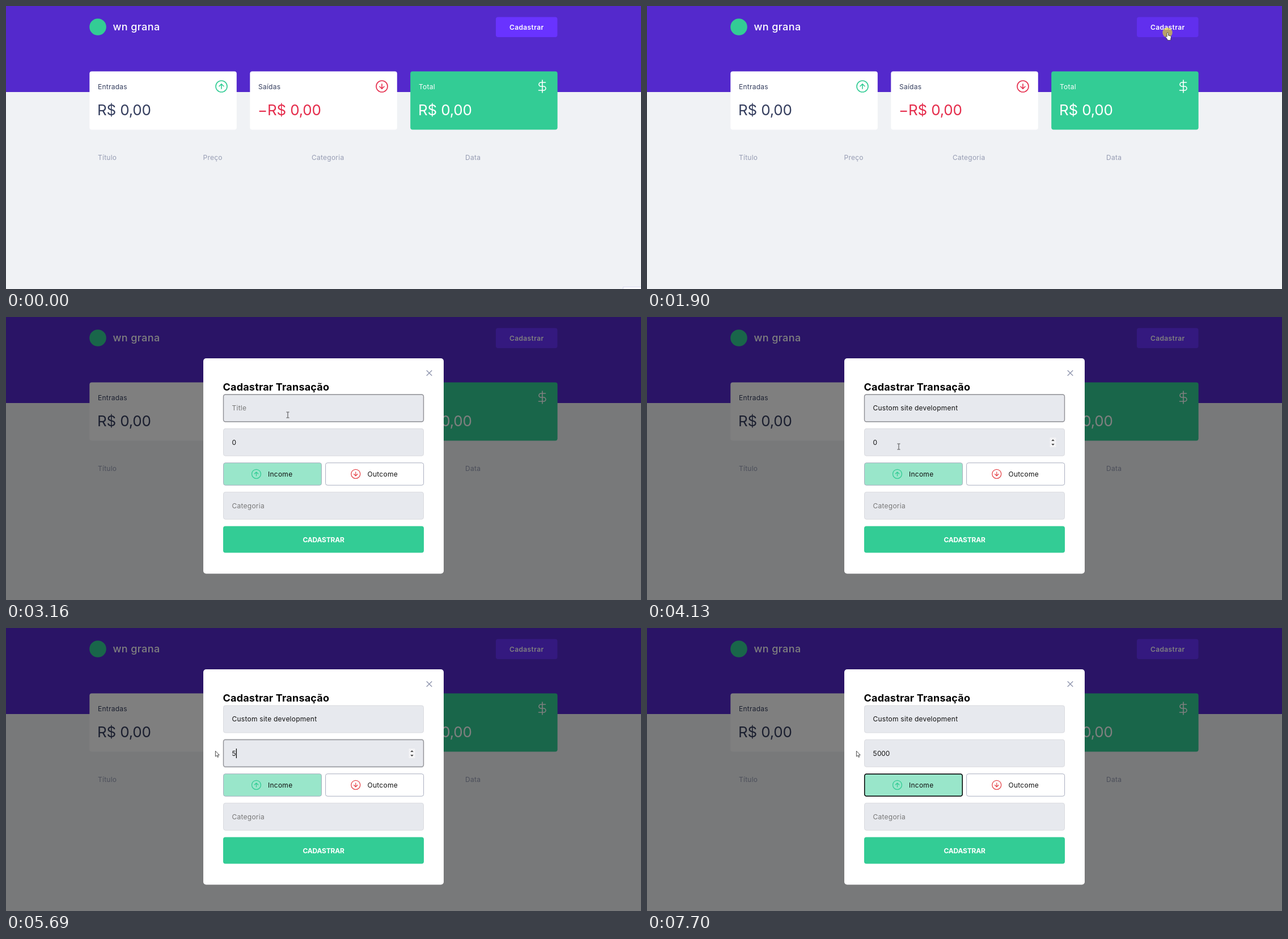
An HTML page that plays this animation: 1120 by 500 pixels, repeating every 8 s.

```html
<!DOCTYPE html>
<html lang="pt-BR">
<head>
<meta charset="utf-8">
<title>Finance dashboard</title>
<style>
html, body { margin: 0; width: 100%; height: 100%; overflow: hidden; background: #f0f2f5; }
svg { display: block; width: 100%; height: 100%; }
text { font: 12px Inter, "Open Sans", sans-serif; letter-spacing: .25px; fill: #363f5f; white-space: pre; }
.brand { font-size: 18px; font-weight: 500; letter-spacing: .4px; fill: #fff; }
.money { font-size: 26px; letter-spacing: -.2px; }
.button { font-weight: 600; letter-spacing: .35px; fill: #fff; text-anchor: middle; }
.submit { font-weight: 700; letter-spacing: -.2px; }
.heading { font-size: 18px; font-weight: 700; letter-spacing: .2px; fill: #000; }
.head text { fill: #969cb3; }
.white { fill: #fff; }
.red { fill: #e52e4d; }
.dark { fill: #111; }
.hint { fill: #777; }
.num { letter-spacing: -.05px; }
.icon { fill: none; stroke: currentColor; stroke-width: 1.6; stroke-linecap: round; stroke-linejoin: round; }
.field { fill: #e7e9ee; stroke: #d9dadf; }
.option { stroke: #a9aebf; }
.ring { fill: none; stroke: #8f9095; stroke-width: 1.4; }

/* Timed parts: hidden unless their keyframes show them. One percent is 80 ms. */
.t { opacity: 0; animation: 8s step-end infinite; }
.corner { animation-name: corner; }
.modal { animation-name: modal; }
.close { animation-name: close; }
.title-hint { animation-name: title-hint; }
.title-text { animation-name: title-text; }
.title-ring { animation-name: title-ring; }
.caret-start { animation-name: caret-start; }
.caret-end { animation-name: caret-end; }
.num-ring { animation-name: num-ring; }
.spinner { animation-name: spinner; }
.zero { animation-name: zero; }
.select { animation-name: select; }
.d1 { animation-name: d1; }
.d2 { animation-name: d2; }
.d3 { animation-name: d3; }
.d4 { animation-name: d4; }
.num-caret { animation-name: num-caret; }
.income-ring { animation-name: income-ring; }
.halo { animation-name: halo; }
.arrow { animation-name: arrow; }
.hand { animation-name: hand; }
.beam { animation-name: beam; }
.cta { fill: #6933ff; animation: hover 8s linear infinite; }
.pointer { animation: path 8s linear infinite; }

@keyframes corner { 0% { opacity: 1 } .375% { opacity: 0 } }
@keyframes modal { 24.625% { opacity: 1 } }
@keyframes close { 25.25% { opacity: 1 } }
@keyframes title-hint { 0% { opacity: 1 } 45.125% { opacity: 0 } }
@keyframes title-text { 45.125% { opacity: 1 } }
@keyframes title-ring { 32.875% { opacity: 1 } 60.125% { opacity: 0 } }
@keyframes caret-start { 32.875% { opacity: 1 } 39.5% { opacity: 0 } }
@keyframes caret-end {
  45.125%, 57.875% { opacity: 1 }
  51.625%, 60.125% { opacity: 0 }
}
@keyframes num-ring { 60.125% { opacity: 1 } 96.25% { opacity: 0 } }
@keyframes spinner { 50.5% { opacity: 1 } 96.25% { opacity: 0 } }
@keyframes zero { 0% { opacity: 1 } 71.125% { opacity: 0 } }
@keyframes select { 61.25% { opacity: 1 } 71.125% { opacity: 0 } }
@keyframes d1 { 71.125% { opacity: 1 } }
@keyframes d2 { 75% { opacity: 1 } }
@keyframes d3 { 77.75% { opacity: 1 } }
@keyframes d4 { 89.5% { opacity: 1 } }
@keyframes num-caret {
  0%, 61.25%, 84.125%, 96.25% { opacity: 0; transform: none }
  60.125%, 71.125% { opacity: 1; transform: none }
  75% { opacity: 1; transform: translateX(7.4px) }
  77.75% { opacity: 1; transform: translateX(14.8px) }
  89.5% { opacity: 1; transform: translateX(22.2px) }
}
@keyframes income-ring { 96.25% { opacity: 1 } }
@keyframes halo {
  23.75%, 32.875%, 60.125% { opacity: .55 }
  24.625%, 34.125%, 64.75% { opacity: 0 }
}
@keyframes arrow {
  3%, 24.625%, 64.75% { opacity: 1 }
  14.125%, 29.125% { opacity: 0 }
}
@keyframes hand { 14.125% { opacity: 1 } 24.625% { opacity: 0 } }
@keyframes beam { 29.125% { opacity: 1 } 64.75% { opacity: 0 } }
@keyframes hover {
  0%, 14.125%, 27.5%, 100% { fill: #6933ff }
  16.6%, 25% { fill: #612fee }
}
@keyframes path {
  0%, 3% { transform: translate(1044px, 458px) }
  4% { transform: translate(1018px, 431px) }
  7.25% { transform: translate(1018px, 431px); animation-timing-function: ease-in-out }
  14.75%, 25.25% { transform: translate(918px, 47px); animation-timing-function: ease-in-out }
  30.875%, 47.125% { transform: translate(497px, 173px); animation-timing-function: ease-in-out }
  51.625%, 56.75% { transform: translate(444px, 229px) }
  57.875%, 60.125% { transform: translate(426px, 229px) }
  61.75% { transform: translate(385px, 219px) }
  63.2% { transform: translate(362px, 219px) }
  64.75%, 100% { transform: translate(369px, 217px) }
}
</style>
</head>
<body>
<svg viewBox="0 0 1120 500">
  <defs>
    <g id="up" class="icon">
      <circle r="10"/>
      <path d="M0 4.3V-4.3M-4-.3L0-4.3L4-.3"/>
    </g>
    <path id="dollar" class="icon" d="M0-11V11M5.5-7H-2.5a3.5 3.5 0 0 0 0 7h5a3.5 3.5 0 0 1 0 7H-6.5"/>
    <rect id="box" x="383.5" width="353" height="48" rx="3.5"/>
  </defs>

  <rect width="1120" height="500" fill="#f0f2f5"/>
  <rect width="1120" height="152" fill="#5429cc"/>
  <circle cx="162" cy="37" r="14.8" fill="#33cc95"/>
  <text class="brand" x="188.5" y="43">wn grana</text>
  <rect class="cta" x="864" y="19.5" width="108.5" height="35.5" rx="4"/>
  <text class="button" x="918.3" y="41.5">Cadastrar</text>

  <g fill="#fff">
    <rect x="147.3" y="115.5" width="259.5" height="103" rx="4"/>
    <rect x="430.3" y="115.5" width="259.5" height="103" rx="4"/>
    <rect x="713.2" y="115.5" width="259.5" height="103" rx="4" fill="#33cc95"/>
  </g>
  <text x="162" y="146.5">Entradas</text>
  <text x="445" y="146.5">Saídas</text>
  <text x="728" y="146.5" class="white">Total</text>
  <text x="161" y="193" class="money">R$ 0,00</text>
  <text x="444" y="193" class="money red">−R$ 0,00</text>
  <text x="727" y="193" class="money white">R$ 0,00</text>
  <use href="#up" transform="translate(380 142)" color="#33cc95"/>
  <use href="#up" transform="translate(663 142) rotate(180)" color="#e52e4d"/>
  <use href="#dollar" transform="translate(946 142)" color="#fff"/>

  <g class="head">
    <text x="162" y="272">Título</text>
    <text x="347.5" y="272">Preço</text>
    <text x="539" y="272">Categoria</text>
    <text x="810" y="272">Data</text>
  </g>
  <rect class="t corner" x="1088.5" y="496.5" width="40" height="10" fill="#fff" stroke="#d9d9ee"/>

  <g class="t modal">
    <rect width="1120" height="500" opacity=".5"/>
    <rect x="348" y="73" width="424" height="380.5" rx="5" fill="#fff"/>
    <path class="t close icon" d="M742.2 94.7l8.6 8.6M750.8 94.7l-8.6 8.6" color="#969cb3"/>
    <text class="heading" x="382.5" y="130">Cadastrar Transação</text>

    <use href="#box" y="137" class="field"/>
    <use href="#box" y="137" class="t title-ring ring"/>
    <text class="t title-hint hint" x="398.5" y="165">Title</text>
    <text class="t title-text dark" x="398.5" y="165">Custom site development</text>
    <path class="t caret-start" d="M399.5 152v17" stroke="#000"/>
    <path class="t caret-end" d="M551.5 152v17" stroke="#000"/>

    <use href="#box" y="197.3" class="field"/>
    <use href="#box" y="197.3" class="t num-ring ring"/>
    <g class="t spinner">
      <rect x="710.5" y="213" width="11" height="17" rx="1" fill="#f3f3f5"/>
      <path d="M713.3 219l2.7-3l2.7 3zM713.3 224l2.7 3l2.7-3z" fill="#444"/>
    </g>
    <text class="t zero num dark" x="398.5" y="226">0</text>
    <g class="t select">
      <rect x="398.5" y="212" width="8" height="18.5" fill="#2f8cf5"/>
      <text class="num white" x="398.5" y="226">0</text>
    </g>
    <text class="num dark" x="398.5" y="226"><tspan class="t d1" style="display:none">5</tspan></text>
    <text class="t d1 num dark" x="398.5" y="226">5</text>
    <text class="t d2 num dark" x="405.9" y="226">0</text>
    <text class="t d3 num dark" x="413.3" y="226">0</text>
    <text class="t d4 num dark" x="420.7" y="226">0</text>
    <path class="t num-caret" d="M406.4 213v17" stroke="#000" stroke-width="1.2"/>

    <rect class="option" x="383.5" y="257.7" width="173" height="39.5" rx="3.5" fill="#99e6ca"/>
    <rect class="option" x="563.6" y="257.7" width="173" height="39.5" rx="3.5" fill="#fff"/>
    <rect class="t income-ring" x="383.7" y="258" width="172.6" height="39" rx="3.5" fill="none" stroke="#000" stroke-width="1.5"/>
    <use href="#up" transform="translate(441.5 277.3) scale(.8)" color="#33cc95"/>
    <use href="#up" transform="translate(616.8 277.3) rotate(180) scale(.8)" color="#e5484d"/>
    <text class="dark" x="462" y="282">Income</text>
    <text class="dark" x="637.5" y="282">Outcome</text>

    <use href="#box" y="309.3" class="field"/>
    <text class="hint" x="398.5" y="338">Categoria</text>
    <rect x="383" y="369.5" width="354" height="47" rx="4" fill="#33cc95"/>
    <text class="button submit" x="560" y="397.7">CADASTRAR</text>
  </g>

  <g class="pointer">
    <circle class="t halo" r="8.7" fill="#ff0"/>
    <path class="t arrow" d="M.4.4V10L2.7 8L4.2 11.4L5.8 10.7L4.3 7.4H7.2Z" fill="#fff" stroke="#222" stroke-width=".8"/>
    <path class="t hand" d="M-.9 1.3q0-1.3 1.2-1.3t1.2 1.3V5l3.6.8q1.5.4 1.3 2L5.7 11.2V13.4H-.2V11.8L-3.5 7.8q-.5-1.2.8-1.4L-.9 7.5Z" fill="#fff" stroke="#222" stroke-width=".7"/>
    <path class="t beam" d="M-2.5-5H-.6L0-4.5L.6-5H2.5M0-4.5V4.5M-2.5 5H-.6L0 4.5L.6 5H2.5" fill="none" stroke="#333" stroke-width=".9"/>
  </g>
</svg>
</body>
</html>
```
